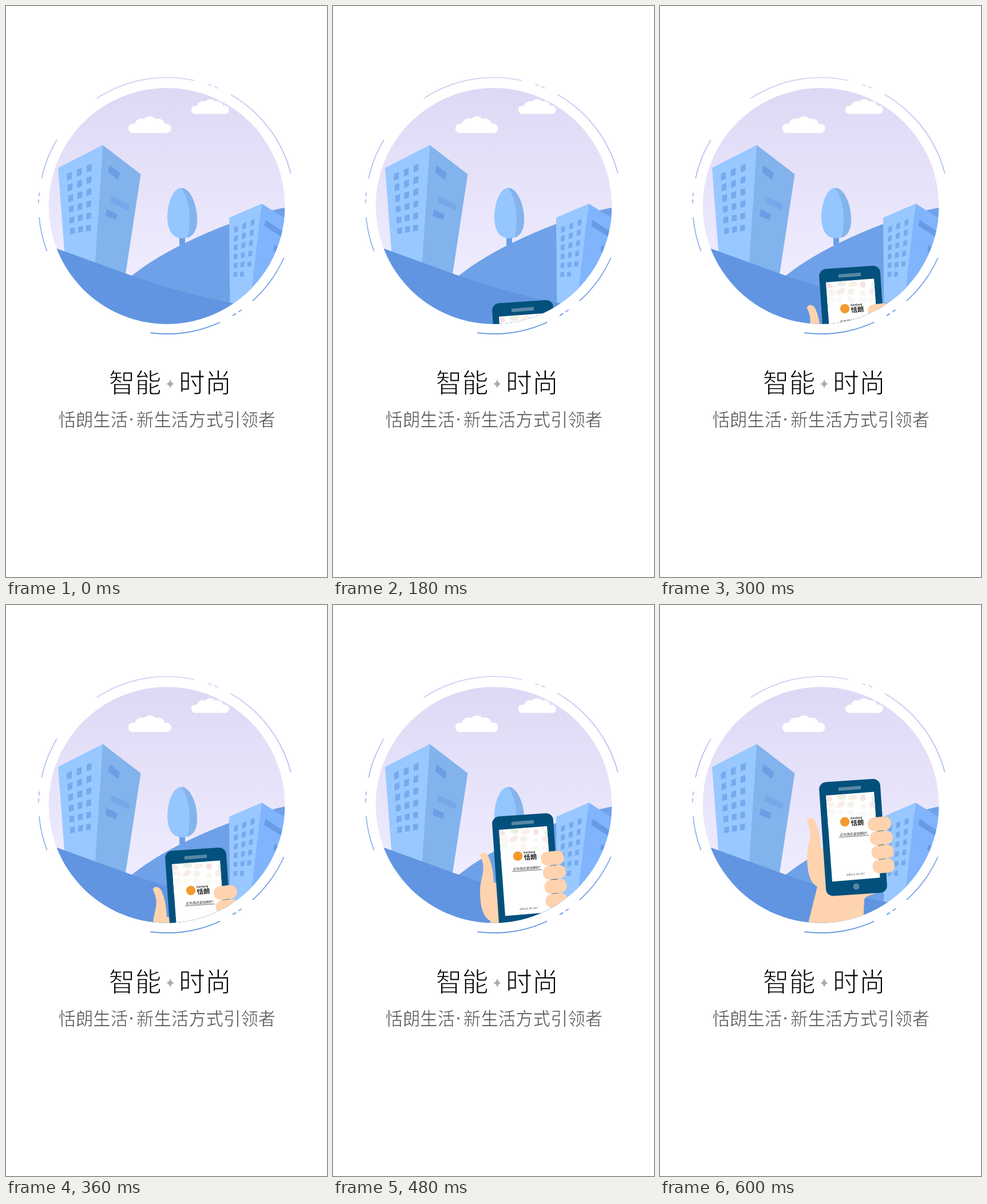
Write an HTML page that moves like this. It is 561 by 998 pixels and loops after 0.93 s.

```html
<!DOCTYPE html>
<html lang="zh-CN">
<head>
<meta charset="utf-8">
<title>智能 · 时尚</title>
<style>
  html, body { margin: 0; width: 100%; height: 100%; overflow: hidden; background: #fff; }
  svg { display: block; width: 561px; height: 998px; }
  text { font-family: "Noto Sans CJK SC", "Noto Sans CJK", sans-serif; }
  /* a white outline thins the strokes */
  .title { font-size: 46px; font-weight: 300; stroke: #fff; stroke-width: 1.2px; }
  .sub { font-size: 30.4px; font-weight: 300; fill: #555; stroke: #fff; stroke-width: .6px; }
</style>
</head>
<body>
<svg viewBox="0 0 561 998" xmlns="http://www.w3.org/2000/svg">
  <defs>
    <linearGradient id="sky" gradientUnits="userSpaceOnUse" x1="0" y1="143" x2="0" y2="470">
      <stop offset="0" stop-color="#dcd9f5"/><stop offset="1" stop-color="#f0ecfe"/>
    </linearGradient>
    <linearGradient id="line" gradientUnits="userSpaceOnUse" x1="0" y1="125" x2="0" y2="573">
      <stop offset="0" stop-color="#d3cef3"/><stop offset=".5" stop-color="#92b2ee"/><stop offset="1" stop-color="#5a90e0"/>
    </linearGradient>
    <linearGradient id="fade" gradientUnits="userSpaceOnUse" x1="0" y1="328" x2="0" y2="378">
      <stop offset="0" stop-color="#fff" stop-opacity="0"/><stop offset="1" stop-color="#fff"/>
    </linearGradient>
    <clipPath id="disc"><circle cx="281" cy="349.5" r="206.3"/></clipPath>
    <clipPath id="screen"><path d="M290 333L374 326.500L384.500 476.500L301 483.500Z"/></clipPath>
  </defs>
  <rect width="561" height="998" fill="#fff"/>
  <g id="ring" fill="none" stroke="url(#line)" stroke-width="1.6"/>

  <g clip-path="url(#disc)">
    <rect x="70" y="140" width="422" height="420" fill="url(#sky)"/>
    <g id="clouds" fill="#fff"/>

    <path d="M91 283L169 243L155.500 455H104Z" fill="#98c8ff"/>
    <path d="M169 243L235.500 294L208 475H154Z" fill="#82b3ec"/>
    <path d="M181 278L199 292L196 304L178.500 291ZM176 355L194.500 364L192 374L174 367Z" fill="#6b9ee7"/>
    <path d="M184 332L215.500 347L214 357.500L182.500 343Z" fill="#76a8e9"/>
    <path id="winA" fill="#76aaef"/>

    <path d="M213 477C252 443 318 408 390 381C425 368 460 357 495 351V560H213Z" fill="#6ea1e8"/>
    <path d="M303 402H313V418H303Z" fill="#6a9ee6"/>
    <path d="M306 318C322 318 334 347 334 373C334 395 324 406 308 406C292 406 282 394 282 368C282 345 292 318 306 318Z" fill="#95c6ff"/>
    <path d="M306 318C322 318 334 347 334 373C334 391 328 402 317 405C323 385 324 342 306 318Z" fill="#84b4ec"/>

    <path d="M390 370L447 345.500L428 510L391.500 540Z" fill="#98c8ff"/>
    <path d="M447 345.500L495 376V520H427Z" fill="#80b4fd"/>
    <path d="M454 374L490 398V409L451 384ZM469 418L484 425V436L467 428Z" fill="#679be5"/>
    <path id="winB" fill="#76aaef"/>

    <path d="M70 418L89 424L209 467.500C275 491 335 508 405 521V560H70Z" fill="#6195e1"/>

    <g id="phone">
      <path d="M256.500 377C259 371 268 371 272 380C277 392 280 404 281 425L340 440L384 501C374 507 360 506 357 515L355 560L350 830H190L258 560L275 492C262 486 257 466 257 440C257 414 270 404 256.500 377Z" fill="#ffd3ae"/>
      <rect x="284" y="306.500" width="107" height="199.500" rx="12.500" transform="rotate(-3.900 337.500 406.250)" fill="#02507c"/>
      <path d="M312 319L351 316V322L312 325Z" fill="#5988a4"/>
      <circle cx="343" cy="492" r="5.500" fill="#5988a4"/>
      <g clip-path="url(#screen)">
        <rect x="285" y="320" width="105" height="170" fill="#fff"/>
        <g id="fruit"/>
        <rect x="285" y="320" width="105" height="66" fill="url(#fade)"/>
      </g>
      <circle cx="323" cy="379" r="8.200" fill="#f39a2b"/>
      <g fill="#222">
        <text transform="translate(333 374.500) rotate(-4)" font-size="5" font-weight="700">tianlang</text>
        <text transform="translate(334 385.500) rotate(-4)" font-size="11.200" font-weight="700">恬朗</text>
        <text transform="translate(314 404) rotate(-4)" font-size="5.800" font-style="italic">买东西还是恬朗好!</text>
        <text transform="translate(326 473) rotate(-4)" font-size="3.800" fill="#555">品质生活, 随心而行</text>
      </g>
      <path d="M313 406L365 402.500" stroke="#444" stroke-width=".8"/>
      <g id="fingers" fill="#ffd3ae"/>
    </g>
  </g>

  <text class="title" x="179.500" y="674.800">智能</text>
  <path d="M287 652Q288 659 294 660.500Q288 662 287 669Q286 662 280 660.500Q286 659 287 652Z" fill="#aaa"/>
  <text class="title" x="302" y="674.800">时尚</text>
  <text class="sub" x="91.500" y="733.500">恬朗生活</text>
  <circle cx="219" cy="722.500" r="2" fill="#666"/>
  <text class="sub" x="228" y="733.500">新生活方式引领者</text>
</svg>
<script>
const NS = 'http://www.w3.org/2000/svg';
const $ = id => document.getElementById(id);
const mix = (a, b, k) => a + (b - a) * k;

function add(parent, tag, attrs) {
  const el = document.createElementNS(NS, tag);
  for (const k in attrs) el.setAttribute(k, attrs[k]);
  $(parent).appendChild(el);
}

function arc(from, to) {
  const at = deg => {
    const a = deg * Math.PI / 180;
    return `${281 + 224 * Math.cos(a)} ${349 + 224 * Math.sin(a)}`;
  };
  add('ring', 'path', { d: `M${at(from)}A224 224 0 0 1 ${at(to)}` });
}

// Two short dashes with a long arc on either side
function ringGroup(mid, before, after) {
  arc(mid - 8.7 - before, mid - 8.7);
  arc(mid - 2.4, mid - 0.7);
  arc(mid + 0.6, mid + 2.4);
  arc(mid + 8.7, mid + 8.7 + after);
}
ringGroup(291.2, 45.6, 45.5);
ringGroup(56.7, 24, 32);
ringGroup(183.5, 15.6, 18.8);

function cloud(x, y, s) {
  for (let i = 0; i < 5; i++) {
    const bulge = Math.sin(Math.PI * i / 4);
    add('clouds', 'circle', { cx: x + (8 + 14.6 * i) * s, cy: y + (21 - 8 * bulge) * s, r: (8.3 + 4.7 * bulge) * s });
  }
  add('clouds', 'rect', { x: x + 8 * s, y: y + 15 * s, width: 59 * s, height: 14 * s });
}
cloud(214, 193, 1);
cloud(324, 163, 0.88);

// Six rows of three, spread between the corner windows
function windows(id, [tl, tr, bl, br], count, w, h, rise) {
  let d = '';
  for (let i = 0; i < count; i++) {
    const u = i % 3 / 2, v = Math.floor(i / 3) / 5;
    const [x, y] = [0, 1].map(n => mix(mix(tl[n], tr[n], u), mix(bl[n], br[n], u), v));
    const up = rise * (1 - 0.6 * v);
    d += `M${x} ${y}l${w} ${-up}v${h - 1.5 * v}l${-w} ${up}z`;
  }
  $(id).setAttribute('d', d);
}
windows('winA', [[106.5, 293.5], [141, 279], [112, 388.5], [140, 383.5]], 18, 8.5, 12, 3.5);
windows('winB', [[398.5, 387], [427.5, 375], [397.5, 465.5], [420.5, 465]], 17, 6.8, 10, 3);

let seed = 7;
const rand = () => (seed = seed * 16807 % 2147483647) / 2147483647;
const tints = ['#f7dcdc', '#e6eedd', '#f8eee0'];
for (let i = 0; i < 15; i++) {
  const cx = 295 + i % 5 * 18 + rand() * 8, cy = 333 + Math.floor(i / 5) * 14 + rand() * 6;
  add('fruit', 'ellipse', {
    cx, cy, rx: 5 + rand() * 4, ry: 4 + rand() * 2, fill: tints[i % 3],
    transform: `rotate(${rand() * 90 - 45} ${cx} ${cy})`
  });
}

for (let i = 0; i < 4; i++) {
  const x = 383.5 + 3.6 * i - 0.4 * i * i, y = 382.5 + 24.6 * i, w = 40.5 - 0.8 * i;
  add('fingers', 'rect', { x: x - w / 2, y: y - 12, width: w, height: 24, rx: 11, transform: `rotate(-6 ${x} ${y})` });
}

const LOOP = 930, START = 120, STEP = 30, RISE = 15, TRAVEL = 240;

function draw(t) {
  const n = Math.floor((t - START) / STEP);
  const y = Math.max(0, TRAVEL - RISE * n);
  $('phone').setAttribute('transform', `translate(0 ${y})`);
  $('phone').setAttribute('visibility', n < 0 ? 'hidden' : 'visible');
}

let t0 = null;
function tick(now) {
  if (t0 === null) t0 = now;
  draw((now - t0) % LOOP);
  requestAnimationFrame(tick);
}
draw(0);
requestAnimationFrame(tick);
</script>
</body>
</html>
```
